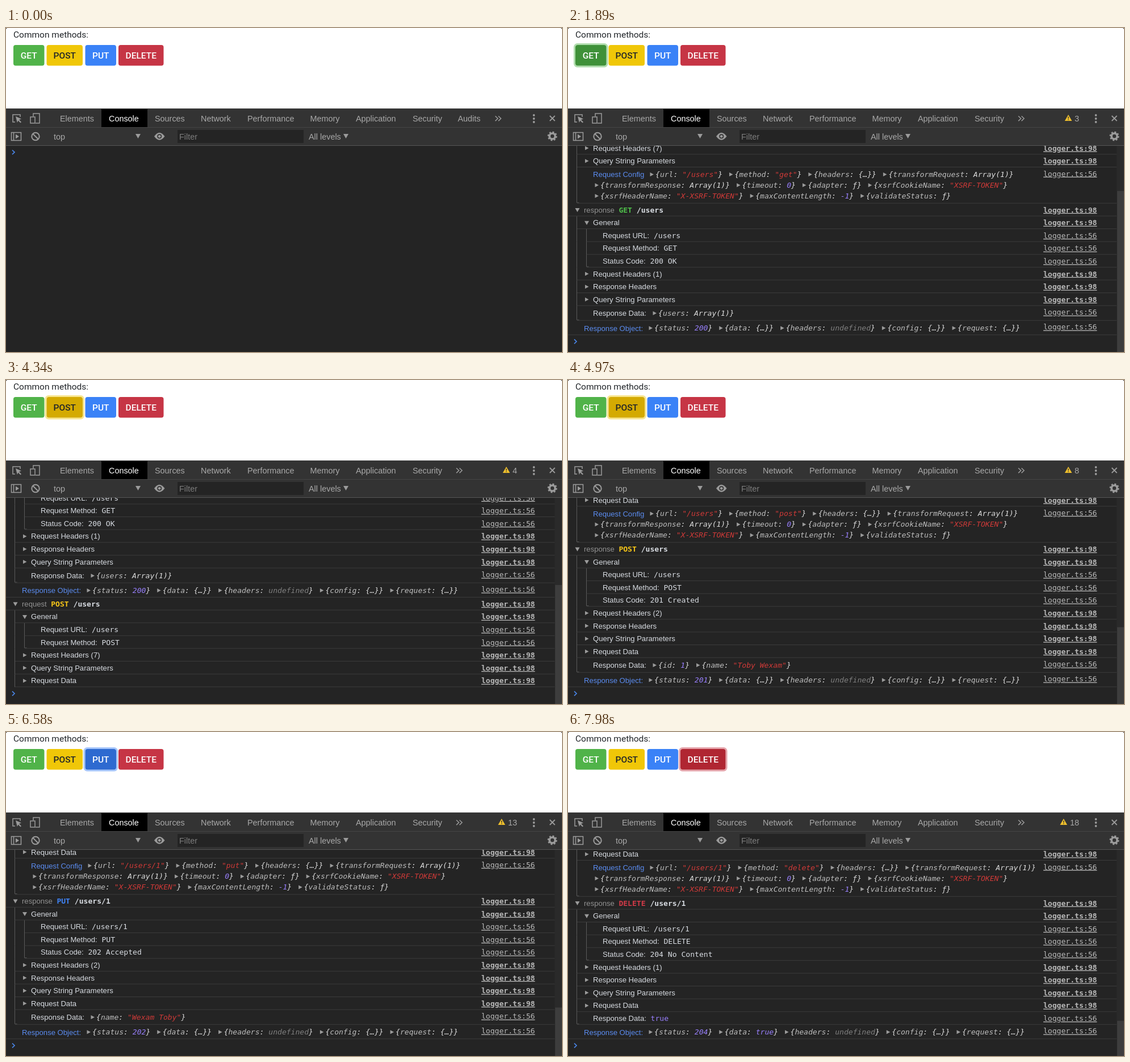
Write an HTML page that moves like this. It is 979 px wide and 572 px high and loops after 8000 ms.

```html
<!DOCTYPE html>
<html lang="en">
<head>
<meta charset="utf-8">
<title>Request logger</title>
<style>
  html, body { margin: 0; width: 100%; height: 100%; overflow: hidden; background: #fff; }
  svg { display: block; width: 100%; height: 100%; }
  text { white-space: pre; }
  .page { font: 15.5px Roboto, sans-serif; }
  .btn { font: 500 15.5px Roboto, sans-serif; text-anchor: middle; }
  .ui { font: 14.4px "Liberation Sans", Arial, sans-serif; fill: #a9a9a9; }
  .row { font: 13.1px "Liberation Sans", Arial, sans-serif; fill: #d8dce2; }
  .mono { font: 13.07px "DejaVu Sans Mono", monospace; }
  .b { font-weight: bold; }
  .obj { font-style: italic; fill: #dcdcdc; }
  .link { fill: #b9b9b9; text-decoration: underline; }
  .key { fill: #bdbdbd; }
  .str { fill: #cf3a38; }
  .num { fill: #9980ff; }
  .nil { fill: #808080; }
  .icon { fill: none; stroke: #9b9b9b; stroke-width: 1.5; }
  .solid { fill: #9b9b9b; }
</style>
</head>
<body>
<svg viewBox="0 0 979 572" preserveAspectRatio="none">
  <defs><clipPath id="view"><rect y="208" width="979" height="364"/></clipPath></defs>
  <rect width="979" height="572" fill="#fff"/>
  <path d="M0 0h2L0 2zM979 0h-2l2 2z" fill="#444"/>
  <text class="page" x="13" y="17" fill="#212529">Common methods:</text>
  <g id="buttons"></g>

  <rect y="142" width="979" height="430" fill="#242424"/>
  <rect y="142" width="979" height="66" fill="#333"/>
  <path d="M0 142.5h979M0 175.5h979" stroke="#444"/>
  <path d="M0 207.5h979" stroke="#555"/>
  <rect x="168" y="143" width="81" height="32" fill="#000"/>
  <rect x="302" y="180" width="222" height="23" fill="#242424"/>
  <g class="ui" id="tabs"></g>
  <g class="ui">
    <text x="84" y="196.5">top</text>
    <text x="305" y="196.5" fill="#7d7d7d">Filter</text>
    <text x="533" y="196.5">All levels</text>
  </g>
  <path class="solid" d="M228 187h9l-4.5 8zM594 187h9l-4.5 8z"/>
  <g class="icon">
    <path d="M16 166h-4v-13h13v4"/>
    <path d="M48 156v-5h11v17h-7M43 157h8v11h-8z"/>
    <path d="M9.5 184.500h17v14h-17zM13.5 184.500v14"/>
    <circle cx="52" cy="191.5" r="6.7" stroke-width="2"/>
    <path d="M47.5 187l9 9" stroke-width="2"/>
    <path d="M957.5 155l9 9m0-9l-9 9" stroke-width="1.8"/>
    <circle cx="962" cy="191" r="5" stroke-width="3.6"/>
    <circle cx="962" cy="191" r="7.3" stroke-width="2.4" stroke-dasharray="2.9 2.83"/>
    <path id="more" d="M861.5 155.500l4.5 4.300-4.500 4.300m5.500-8.600l4.5 4.300-4.500 4.300"/>
  </g>
  <path class="solid" d="M17 156l10 4.500-4 1.500 4 4-1.500 1.500-4-4-1.700 3.500zM17 187.500l6 4-6 4z"/>
  <path class="solid" d="M261 191.300q9-13 18.500 0q-9.500 13-18.500 0z"/>
  <circle cx="270.2" cy="191.3" r="4" fill="#333"/>
  <circle class="solid" cx="270.2" cy="191.3" r="2.4"/>
  <g class="solid">
    <circle cx="929.5" cy="154" r="1.9"/><circle cx="929.5" cy="160" r="1.9"/><circle cx="929.5" cy="166" r="1.9"/>
  </g>
  <g id="badge">
    <g id="warn">
      <path d="M881 153l6.3 11h-12.600z" fill="#f0c02c"/>
      <path d="M881 156.500v3.500m0 1v1.500" stroke="#333" stroke-width="1.4"/>
    </g>
    <text class="ui" id="count" x="900" y="164.5" text-anchor="end"></text>
  </g>

  <g clip-path="url(#view)">
    <g id="log">
      <g id="rows"></g>
      <path id="prompt" fill="none" stroke="#4a86e8" stroke-width="1.7"/>
    </g>
    <g id="bar">
      <rect x="966" y="208" width="13" height="364" fill="#2a2a2a"/>
      <rect id="thumb" x="967" width="12" fill="#3d3d3d"/>
    </g>
  </g>
</svg>
<script>
const $ = id => document.getElementById(id);
const LOOP = 8000, TOP = 208, VIEW = 364, ROW = 22.6, TAIL = 29.8, CHAR = 7.868;

// label, x, width, colour, active colour, text colour, hover time, focus time
const buttons = [
  ['GET', 13, 54.5, [80, 179, 73], [63, 145, 57], '#fff', 70, 550],
  ['POST', 71.5, 63.5, [240, 199, 8], [212, 170, 2], '#212529', 3150, 4150],
  ['PUT', 139.5, 54.5, [58, 130, 247], [46, 106, 208], '#fff', 5780, 6230],
  ['DELETE', 198, 79.5, [198, 53, 69], [176, 38, 50], '#fff', 7020, 7340]
];
// at: times of request, config and response
const calls = [
  { verb: 'GET', color: '#4fc14b', url: '/users', status: '200 OK', headers: 1,
    reply: ['{users: Array(1)}'], at: [560, 630, 770], warn: 0 },
  { verb: 'POST', color: '#f5c518', url: '/users', status: '201 Created', headers: 2, body: true,
    reply: ['{id: 1}', '{name: "Toby Wexam"}'], at: [4310, 4410, 4480], warn: 3 },
  { verb: 'PUT', color: '#3f83f5', url: '/users/1', status: '202 Accepted', headers: 2, body: true,
    reply: ['{name: "Wexam Toby"}'], at: [6300, 6370, 6440], warn: 8 },
  { verb: 'DELETE', color: '#d23a48', url: '/users/1', status: '204 No Content', headers: 1, body: true,
    at: [7420, 7490, 7560], warn: 13 }
];

const mono = (s, cls = '', extra = '') => `<tspan class="mono ${cls}" ${extra}>${s}</tspan>`;
const label = (x, y, s, fill = '') => `<text x="${x}" y="${y}"${fill && ` fill="${fill}"`}>${s}</text>`;
const right = (x, y) => `<path class="solid" d="M${x} ${y - 3.5}l6.5 3.5-6.5 3.5z"/>`;
const down = (x, y) => `<path class="solid" d="M${x} ${y - 3}h8l-4 7z"/>`;

function tint(s) {
  const kinds = ['str', 'key', 'nil', 'num'];
  return s.replace(/("[^"]*")|(\w+(?=:))|(undefined)|(true|-?\d+(?=}))/g,
    (m, ...g) => `<tspan class="${kinds[g.slice(0, 4).findIndex(Boolean)]}">${m}</tspan>`);
}

function objects(x, y, list) {
  return list.map(s => {
    const out = right(x - 9.5, y - 4.5) + `<text class="mono obj" x="${x}" y="${y}">${tint(s)}</text>`;
    x += s.length * CHAR + 21.4;
    return out;
  }).join('');
}

const rows = [];
let end = 0, markup = '';

// close: how many group lines end in this row
function add(at, depth, line, body, { h = ROW, lift = 0, close = 0 } = {}) {
  let s = body;
  for (let d = 1; d <= depth; d++) {
    const x = 17 * d - 1.5, hook = close && d > depth - close;
    s += `<path d="M${x} 0V${hook ? h - 1.5 : h}${hook ? 'h4' : ''}" fill="none" stroke="#5a5a5a"/>`;
  }
  s += `<path d="M${[0, 16, 33][depth]} ${h - 0.5}H966" stroke="#3b3b3b"/>`;
  s += `<text class="mono link${line === 98 ? ' b' : ''}" x="837" y="${15.9 - lift}">logger.ts:${line}</text>`;
  markup += `<g class="row" transform="translate(0 ${end.toFixed(2)})">${s}</g>`;
  end += h;
  rows.push({ at, end });
}

function head(at, kind, c) {
  add(at, 0, 98, down(12.5, 11.3) + label(28, 15.9,
    `<tspan fill="#929292">${kind}</tspan>` + mono(c.verb, 'b', `dx="7.5" fill="${c.color}"`) + mono(' ' + c.url, 'b')));
  add(at, 1, 98, down(29, 11.3) + label(44, 15.9, 'General'));
}
const pair = (at, name, value, close) =>
  add(at, 2, 56, label(61, 15.9, name + ':' + mono(value, '', 'dx="7.7"')), { close });
const fold = (at, name) => add(at, 1, 98, right(30, 11.3) + label(44, 15.9, name));

function logCall(c) {
  const [t0, t1, t2] = c.at, blue = '#5b8cf0';
  head(t0, 'request', c);
  pair(t0, 'Request URL', c.url);
  pair(t0, 'Request Method', c.verb, 1);
  fold(t0, 'Request Headers (7)');
  fold(t0, 'Query String Parameters');
  if (c.body) fold(t0, 'Request Data');
  add(t1, 1, 56, label(44, 17.4, 'Request Config', blue) +
    objects(154, 17, [`{url: "${c.url}"}`, `{method: "${c.verb.toLowerCase()}"}`, '{headers: {…}}', '{transformRequest: Array(1)}']) +
    objects(57, 36, ['{transformResponse: Array(1)}', '{timeout: 0}', '{adapter: ƒ}', '{xsrfCookieName: "XSRF-TOKEN"}']) +
    objects(57, 55, ['{xsrfHeaderName: "X-XSRF-TOKEN"}', '{maxContentLength: -1}', '{validateStatus: ƒ}']),
    { h: 63.8, lift: 0.4, close: 1 });

  head(t2, 'response', c);
  pair(t2, 'Request URL', c.url);
  pair(t2, 'Request Method', c.verb);
  pair(t2, 'Status Code', c.status, 1);
  fold(t2, `Request Headers (${c.headers})`);
  fold(t2, 'Response Headers');
  fold(t2, 'Query String Parameters');
  if (c.body) fold(t2, 'Request Data');
  if (c.reply)
    add(t2, 1, 56, label(44, 17.9, 'Response Data:') + objects(159, 17.5, c.reply), { h: 26.2, close: 1 });
  else
    add(t2, 1, 56, label(44, 15.9, 'Response Data:' + mono('true', 'num', 'dx="7.7"')), { close: 1 });
  const data = c.reply ? '{…}' : 'true';
  add(t2, 0, 56, label(28, 17.9, 'Response Object:', blue) +
    objects(152, 17.4, [`{status: ${c.status.slice(0, 3)}}`, `{data: ${data}}`, '{headers: undefined}', '{config: {…}}', '{request: {…}}']),
    { h: 25.4, lift: 0.2 });
}
calls.forEach(logCall);
$('rows').innerHTML = markup;
const rowNodes = [...$('rows').children];

$('buttons').innerHTML = buttons.map(([name, x, w, , , ink]) =>
  `<rect x="${x - 1.5}" y="28.5" width="${w + 3}" height="39.5" rx="5" fill="none" stroke-width="3"/>` +
  `<rect x="${x}" y="30" width="${w}" height="36.5" rx="4"/>` +
  `<text class="btn" x="${x + w / 2}" y="54" fill="${ink}">${name}</text>`).join('');
const buttonNodes = [...$('buttons').children];

const tabs = [['Elements', 95], ['Console', 181], ['Sources', 262], ['Network', 343], ['Performance', 425],
  ['Memory', 535.5], ['Application', 616], ['Security', 716], ['Audits', 795.5]];
$('tabs').innerHTML = tabs.map(([s, x]) => label(x, 164.5, s, s === 'Console' ? '#fff' : '')).join('');
const audits = $('tabs').lastElementChild;

const show = (node, on) => node.setAttribute('visibility', on ? 'visible' : 'hidden');
const shift = (node, x, y = 0) => node.setAttribute('transform', `translate(${x} ${y.toFixed(2)})`);
const fade = (t, from) => {
  const k = Math.min(1, Math.max(0, (t - from) / 140));
  return k * k * (3 - 2 * k);
};

function drawButtons(t) {
  buttons.forEach(([, , , base, dark, , hover, focus], i) => {
    const next = buttons[i + 1], gone = next ? fade(t, next[7]) : 0;
    const k = fade(t, hover) - gone;
    const rgb = base.map((v, j) => Math.round(v + (dark[j] - v) * k));
    const [ring, face] = buttonNodes.slice(i * 3);
    face.setAttribute('fill', `rgb(${rgb})`);
    ring.setAttribute('stroke', `rgb(${base})`);
    ring.setAttribute('stroke-opacity', 0.45 * (fade(t, focus) - gone));
  });
}

function drawBadge(t) {
  const c = calls.filter(c => t >= c.at[0]).pop();
  show($('badge'), c);
  show(audits, !c);
  shift($('more'), c ? -68.5 : 0);
  if (!c) return;
  const n = c.warn + (t < c.at[2] ? 1 : c.body ? 5 : 3);
  $('count').textContent = n;
  shift($('warn'), n > 9 ? -8.3 : 0);
}

function drawLog(t) {
  let height = 0;
  rows.forEach((r, i) => {
    const on = t >= r.at;
    show(rowNodes[i], on);
    if (on) height = r.end;
  });
  const total = height + TAIL, scroll = Math.max(0, total - VIEW);
  shift($('log'), 0, TOP - scroll);
  $('prompt').setAttribute('d', `M11 ${height + 7.5}l4 3.8-4 3.8`);
  show($('bar'), scroll > 0);
  const size = VIEW * VIEW / total - Math.min(8, total / 170);
  $('thumb').setAttribute('y', 572 - size);
  $('thumb').setAttribute('height', size);
}

function draw(t) {
  drawButtons(t);
  drawBadge(t);
  drawLog(t);
}

const start = performance.now();
function tick() {
  draw((performance.now() - start) % LOOP);
  requestAnimationFrame(tick);
}
tick();
</script>
</body>
</html>
```
